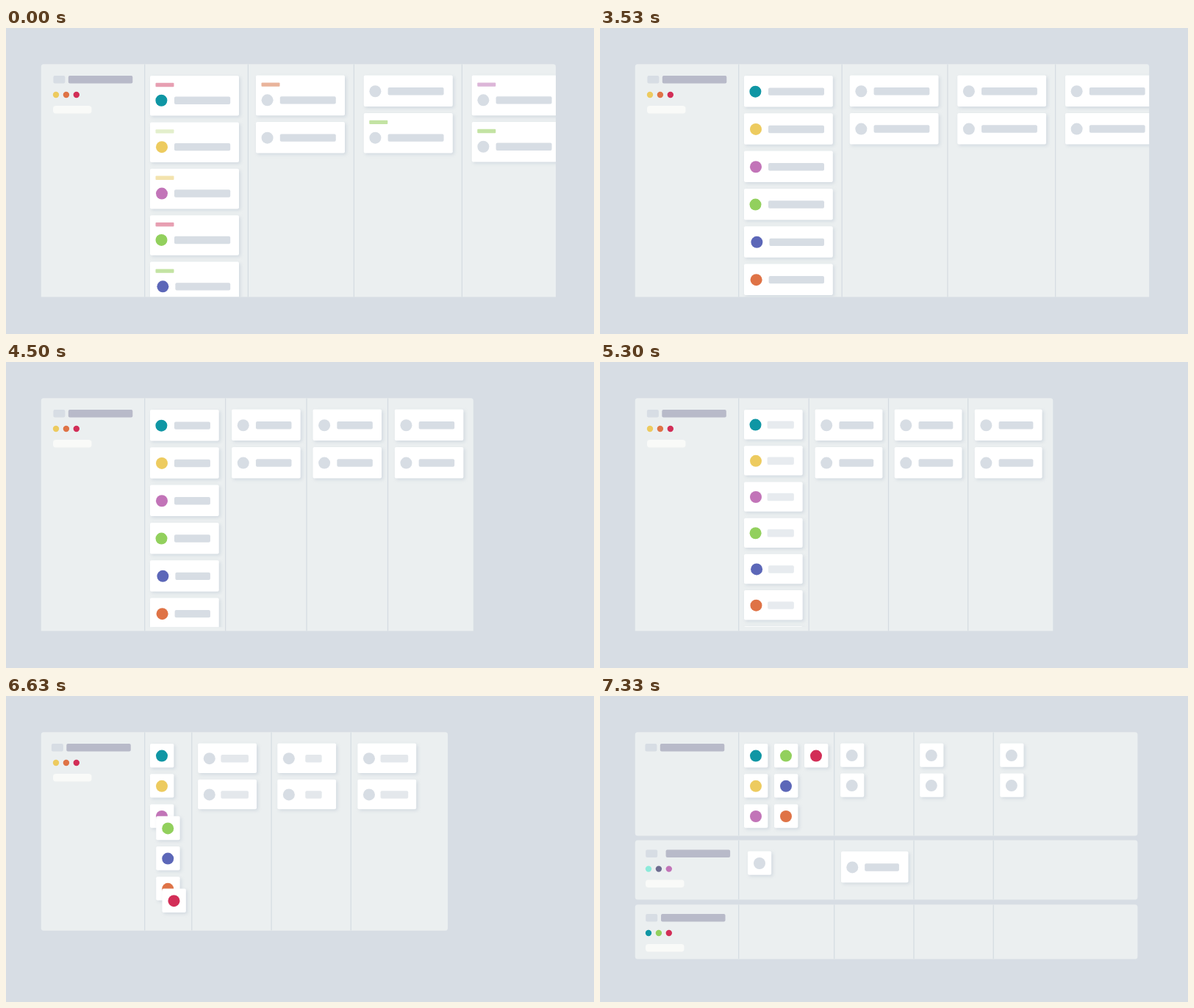
Recreate the animation shown at these times as an HTML page with a canvas. Size 800 px wide and 417 px high, loop 9510 ms.

```html
<!DOCTYPE html>
<html>
<head>
<meta charset="utf-8">
<title>Board layout</title>
<style>
html, body { margin: 0; height: 100%; overflow: hidden; background: #d7dde4; }
canvas { display: block; }
</style>
</head>
<body>
<canvas id="stage" width="800" height="417"></canvas>
<script>
const ctx = document.getElementById('stage').getContext('2d');
const LOOP = 9510, BASE = 366.6, LEFT = 188.7, GAP = 8.8, TOP = 65;
const BG = '#d7dde4', BOARD = '#ebeff0', TITLE = '#b8bac9', PALE = '#f9faf8';
const TEAL = '#0f96a4', YELLOW = '#edcb5f', PINK = '#c274b8', GREEN = '#92d05d';
const BLUE = '#5c67b8', ORANGE = '#df7346', RED = '#d22e57';
const LIME = '#c3e3a3', ROSE = '#e79fb2';

const people = [TEAL, YELLOW, PINK, GREEN, BLUE, ORANGE, RED];
const peopleTags = [ROSE, '#e3efcc', '#f3e3ae', ROSE, LIME, ROSE, LIME];
const nudge = [-.6, 0, 0, -.5, 1.4, .6, 0];
const otherTags = [['#e9b49b', null], [null, LIME], ['#dcb6d8', LIME]];

const clamp = v => Math.min(1, Math.max(0, v));
const mix = (a, b, p) => a + (b - a) * p;
const span = (t, a, b) => clamp((t - a) / (b - a));
const cubic = u => u < .5 ? 4 * u ** 3 : 1 - 4 * (1 - u) ** 3;
const sweep = (u, a) => u ** a / (u ** a + (1 - u) ** 1.2);

function box(x, y, w, h, r, color, alpha = 1) {
  if (w <= 0 || alpha <= 0) return;
  ctx.save();
  ctx.globalAlpha *= alpha;
  ctx.fillStyle = color;
  ctx.beginPath();
  ctx.roundRect(x, y, w, h, r);
  ctx.fill();
  ctx.restore();
}

const dot = (x, y, r, color, alpha) => box(x - r, y - r, 2 * r, 2 * r, r, color, alpha);

function clipped(x, y, w, h, r, draw) {
  ctx.save();
  ctx.beginPath();
  ctx.roundRect(x, y, w, h, r);
  ctx.clip();
  draw();
  ctx.restore();
}

function paper(x, y, w, h) {
  ctx.save();
  ctx.shadowColor = 'rgba(170,185,200,.38)';
  ctx.shadowBlur = 4;
  ctx.shadowOffsetX = ctx.shadowOffsetY = 2;
  box(x, y, w, h, 2, '#fff');
  ctx.restore();
}

// extra: height taken by the tag above the avatar line
function card(x, y, w, h, extra, o) {
  paper(x, y, w, h + extra);
  if (o.tag) box(x + 7.5, y + 9.8 - o.lift, 25, 5.4, 1, o.tag, o.tagAlpha);
  const cy = y + h / 2 + extra + .4;
  dot(x + o.cx, cy, 8, o.color || BG);
  const left = o.left + (o.dx || 0);
  box(x + left, cy - 5.2, w - left - o.right, 10.4, 2, BG, o.barAlpha);
}

function panel(x, titleX, y, dots, dotX, paleX, alpha) {
  box(x, y, 16, 10.4, 2, BG);
  box(titleX, y, 87.5, 10.4, 2, TITLE);
  dots.forEach((c, i) => dot(dotX + 13.9 * i, y + 26, 4.2, c, alpha));
  box(paleX, y + 41, 52.5, 10.4, 4, PALE, alpha);
}

function board(y, h, right, edges, draw) {
  box(47.8, y, right - 47.8, h, 3.5, BOARD);
  clipped(47.8, y, right - 47.8, h, 3.5, () => {
    edges.forEach(x => box(x - .6, y, 1.2, h, 0, '#d4dbe1'));
    draw();
  });
}

function frame(t) {
  const fold = cubic(span(t, 2900, 3340));
  const narrow = sweep(span(t, 3450, 4600), 1.9);
  const pack = sweep(span(t, 4810, 6000), 2.24);
  const wrap = cubic(span(t, 6240, 7300));
  const lift = 5.5 * span(t, 2930, 2970);
  const tagAlpha = 1 - span(t, 2970, 3170);
  const extra = 12.1 * (1 - fold);

  const widths = [
    mix(mix(mix(140.7, 108, narrow), 47.5, pack), 130, wrap),
    mix(144, 108.3, narrow),
    mix(147, 108.2, narrow),
    mix(127.6, 115.6, narrow) + 80.6 * wrap
  ];
  const edges = [LEFT];
  widths.forEach((w, i) => edges.push(edges[i] + w));
  const right = edges.pop();

  const h1 = mix(42.5, 32.4, pack), w1 = mix(mix(121, 92, narrow), 32.4, pack);
  const h2 = mix(42.5, 32.2, wrap), w2 = mix(mix(121, 91.8, narrow), 32.2, wrap);
  const stack = TOP + 7 * (h1 + extra) + 6 * GAP + 7.5;
  const bottom = mix(stack, 190.5, wrap);

  ctx.fillStyle = BG;
  ctx.fillRect(0, 0, 800, 417);

  clipped(0, 0, 800, BASE, 0, () => {
    board(49.3, bottom - 49.3, right, edges, () => {
      const shift = 2.4 * pack + .6 * wrap;
      panel(64.4 - shift, 84.8 - shift, 65, [YELLOW, ORANGE, RED], 68, 64,
        1 - span(wrap, .4, .85));

      clipped(0, 0, 800, BASE - 5.6 * narrow, 0, () => people.forEach((color, i) => {
        const group = Math.floor(i / 3);
        const step = h1 + extra + GAP;
        const x = 196 + 41 * group * wrap;
        const y = TOP + step * (i - 3 * group * wrap);
        card(x, y, w1, h1, extra, {
          color, tag: peopleTags[i], lift, tagAlpha,
          cx: 16 + nudge[i] * (1 - pack), dx: Math.max(0, nudge[i]),
          left: 33 - 7 * pack, right: 11.8, barAlpha: 1 - 2 * pack
        });
      }));

      otherTags.forEach((tags, c) => {
        const off = mix([10.6, 13.4, 13.4][c], [8.4, 8.2, 9.1][c], narrow);
        let y = TOP - .4;
        tags.forEach(tag => {
          const more = tag ? extra : 0;
          card(edges[c + 1] + off, y, w2, h2, more, {
            tag, lift, tagAlpha, cx: 15.6,
            left: 32.8 + (c == 1 ? 26 : -8) * wrap,
            right: 12.2 + (c == 1 ? 36 : -6) * wrap,
            barAlpha: 1 - 1.6 * wrap
          });
          y += h2 + more + GAP;
        });
      });
    });

    // lower rows ride up beneath the first one
    const show = span(wrap, .45, .85);
    if (!show) return;
    ctx.globalAlpha = show;
    ctx.translate(0, bottom - 190.5);
    board(196.6, 80.8, right, edges, () => {
      panel(62.2, 89.6, 209.6, ['#8ceada', '#6e6d90', PINK], 66, 62, 1);
      card(201, 211.5, 32.2, 32.2, 0, { cx: 16, left: 33, right: 12 });
      card(328, 211.8, 91.5, 42.5, 0, { cx: 15.3, left: 32.2, right: 12.6 });
    });
    board(284.2, 74.2, right, edges, () =>
      panel(62.2, 83, 297, [TEAL, GREEN, RED], 66, 62, 1));
  });
}

const start = performance.now();
function tick() {
  frame((performance.now() - start) % LOOP);
  requestAnimationFrame(tick);
}
tick();
</script>
</body>
</html>
```
